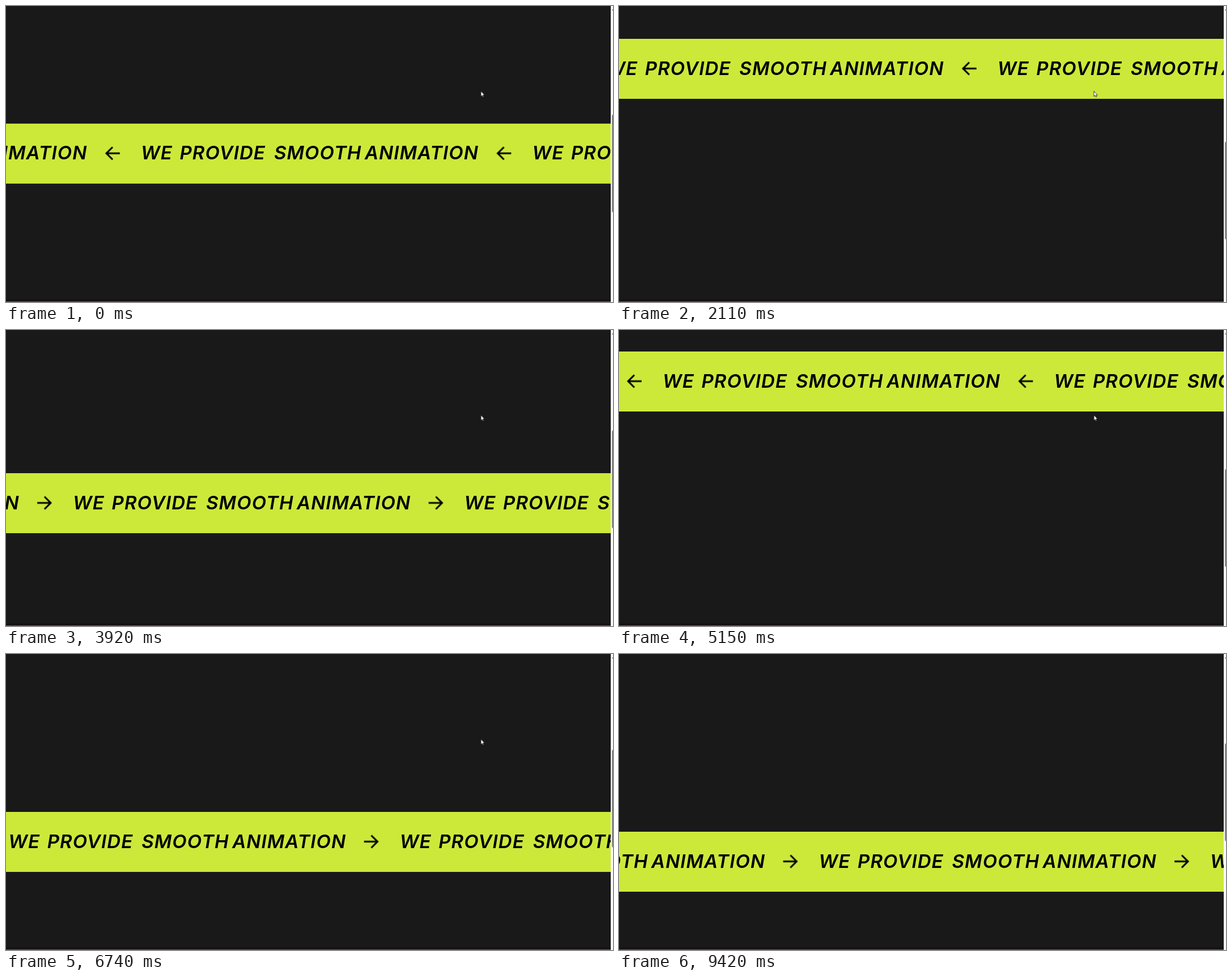
An HTML page that plays this animation: 1071x523 px, repeating every 9.44 s.

```html
<!DOCTYPE html>
<html lang="en">
<head>
<meta charset="utf-8">
<title>Marquee</title>
<style>
  @property --y { syntax: "<number>"; inherits: true; initial-value: 208; }

  html, body { margin: 0; width: 100%; height: 100%; overflow: hidden; background: #191919; }

  svg { display: block; width: 1071px; height: 523px; animation: scroll 9.44s linear infinite; }

  .band { transform: translateY(calc(var(--y) * 1px)); }
  .thumb { transform: translateY(calc((258.2 - .319 * var(--y)) * 1px)); }
  .track { animation: slide 9.44s linear infinite; }
  .arrow { animation: turn 9.44s linear infinite; fill: none; stroke: #000; stroke-width: 3.1; }
  .cursor { animation: leave 9.44s linear infinite; }

  text {
    font: italic 600 33px Inter, "Liberation Sans", sans-serif;
    font-optical-sizing: none;
    letter-spacing: 1.1px;
  }

  /* page scroll, as the top edge of the band */
  @keyframes scroll {
    0% { --y: 208; animation-timing-function: ease-out; }
    2.12% { --y: 186; }
    10.06% { --y: 186; animation-timing-function: ease-in-out; }
    20.23% { --y: 59; }
    20.66%, 27.22% { --y: 58; }
    30.72% { --y: 153; animation-timing-function: ease-out; }
    36.02%, 47.56% { --y: 253; }
    51.17% { --y: 97; animation-timing-function: ease-out; }
    53.5% { --y: 38; }
    65.57% { --y: 38; animation-timing-function: ease-out; }
    71.4% { --y: 279; }
    79.13% { --y: 279; animation-timing-function: ease-in-out; }
    81.57%, 100% { --y: 314; }
  }

  /* the text runs with the direction of the last scroll */
  @keyframes slide {
    0% { transform: translateX(239px); }
    22.35% { transform: translateX(-21.5px); }
    27.22% { transform: translateX(-78px); }
    41.53% { transform: translateX(119px); }
    47.56% { transform: translateX(186px); }
    54.56% { transform: translateX(78px); }
    65.57% { transform: translateX(-78px); }
    71.4% { transform: translateX(5px); }
    79.13% { transform: translateX(125px); }
    88.67% { transform: translateX(230.5px); }
    100% { transform: translateX(355.8px); }
  }

  @keyframes turn {
    0% { transform: rotate(180deg); }
    27.22% { transform: rotate(180deg); animation-timing-function: ease-out; }
    33% { transform: rotate(0deg); }
    47.56% { transform: rotate(0deg); animation-timing-function: ease-out; }
    53.4% { transform: rotate(180deg); }
    65.57% { transform: rotate(180deg); animation-timing-function: ease-out; }
    71.3%, 100% { transform: rotate(0deg); }
  }

  @keyframes leave {
    0%, 90.47% { transform: translate(837.6px, 150px); }
    91.84% { transform: translate(837.6px, 374px); }
    92.8%, 100% { transform: translate(837.6px, 530px); }
  }
</style>
</head>
<body>
<svg viewBox="0 0 1071 523">
  <rect width="1071" height="523" fill="#191919"/>
  <rect y="518" width="1067" height="4" fill="#171114"/>
  <rect y="522" width="1067" height="1" fill="#6a6666"/>

  <g class="band">
    <rect width="1067" height="106" fill="#cce93a"/>
    <g class="track" id="track"></g>
  </g>

  <rect x="1067" width="4" height="523" fill="#fafafa"/>
  <path d="M1069 8l2-3v3z" fill="#777"/>
  <rect class="thumb" x="1069" width="6" height="172.5" rx="2" fill="#858585"/>

  <path class="cursor" d="M.3.3v9.6l2.1-2 1.4 3 1.5-.7-1.4-2.9h2.7z"
        fill="#fff" stroke="#111" stroke-width=".8"/>
</svg>
<script>
  const period = 690.5;
  const words = [["WE", -1], ["PROVIDE", 67.5], ["SMOOTH", 234], ["ANIMATION", 394]];
  const label = words.map(([word, x]) => `<text x="${x}" y="63.5">${word}</text>`).join("");
  const item = k => `<g transform="translate(${k * period} 0)">
    ${label}
    <g transform="translate(639.5 52.5)"><path class="arrow" d="M-13 0H10.5M-.2-11L10.8 0L-.2 11"/></g>
  </g>`;
  document.getElementById("track").innerHTML = [-1, 0, 1].map(item).join("");
</script>
</body>
</html>
```
